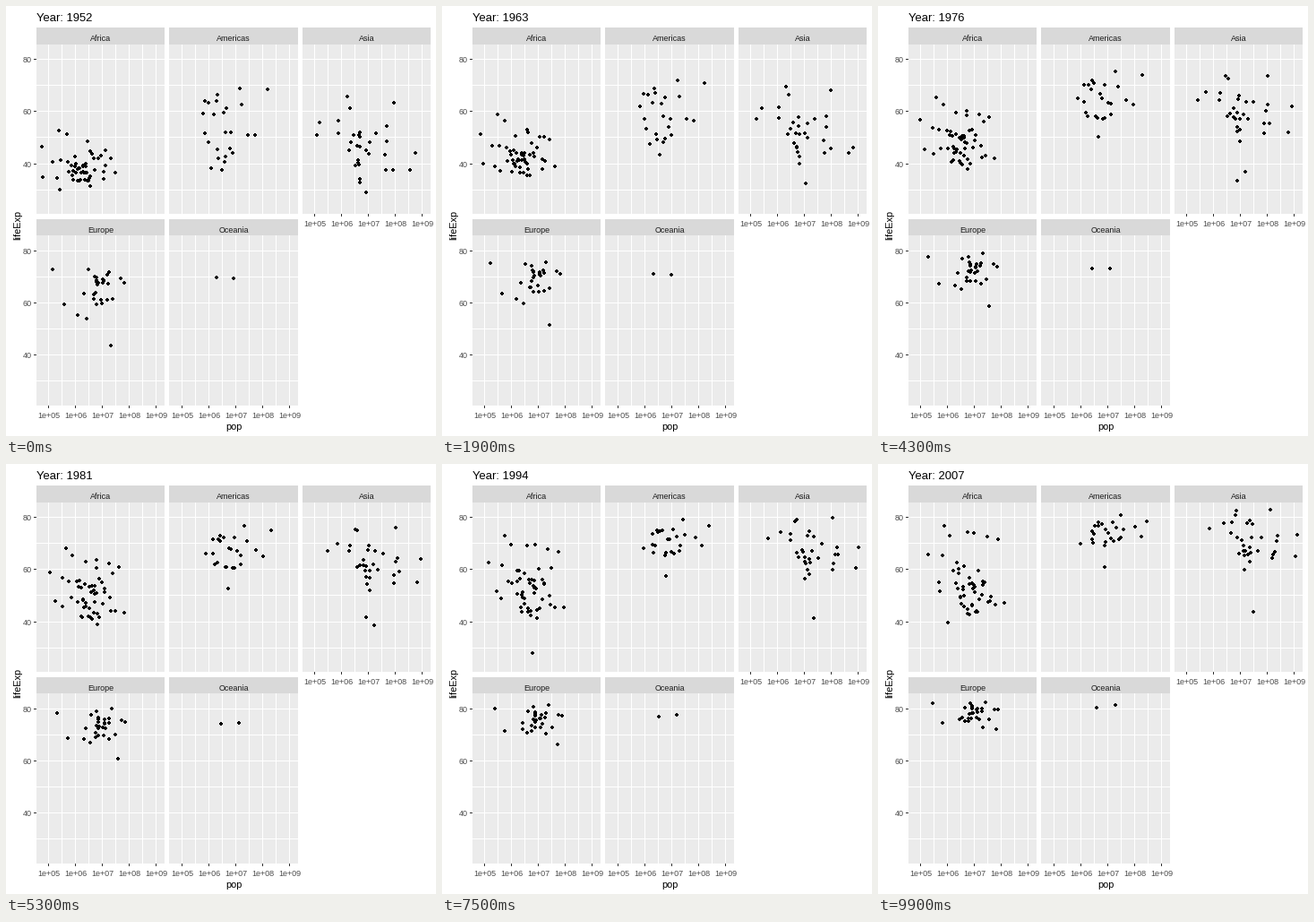
A matplotlib script for the animation above (10000 ms loop, 480 by 480 pixels).

```python
import numpy as np
import matplotlib.pyplot as plt
from matplotlib.animation import FuncAnimation
from matplotlib.collections import PolyCollection
from matplotlib.patches import Rectangle

plt.rcParams["font.family"] = "Liberation Sans"

SIZE, DPI, FRAMES = 480, 72, 100
START, MID, END = 1952, 1987, 2007
YEARS = np.linspace(START, END, FRAMES)

# Panel layout in pixels, y pointing down
LEFT, TOP, WIDTH, HEIGHT = 33.6, 42.6, 143.3, 189.5
COL_STEP, ROW_STEP, STRIP = 148.8, 213.7, 18.4
X_MIN, X_SPAN = 4.561, 4.776
Y_MAX, Y_SPAN = 85.553, 64.904

fig = plt.figure(figsize=(SIZE / DPI, SIZE / DPI), dpi=DPI, facecolor="white")
ax = fig.add_axes([0, 0, 1, 1])
ax.set(xlim=(0, SIZE), ylim=(SIZE, 0))
ax.axis("off")

# Small round dot on the pixel grid: a quarter outline turned four times
DOT = np.array([p for k in range(4)
                for p in [(q * 1j ** k).real + 1j * (q * 1j ** k).imag
                          for q in (-1 - 2j, 1 - 2j, 1 - 1j)]])
DOT = np.column_stack([DOT.real, DOT.imag])


def px(value):
    return np.floor(np.asarray(value) + 0.5).astype(int)


def box(x0, y0, x1, y1, color):
    ax.add_patch(Rectangle((x0, y0), x1 - x0, y1 - y0, fc=color, lw=0,
                           antialiased=False))


def label(x, y, text, size=9, color="black", ha="center", **kw):
    return ax.text(x, y, text, fontsize=size, color=color, ha=ha,
                   va="baseline", **kw)


def x_pos(log_pop, col):
    return px(LEFT + COL_STEP * col + (log_pop - X_MIN) / X_SPAN * WIDTH)


def y_pos(life, row):
    return px(TOP + ROW_STEP * row + (Y_MAX - life) / Y_SPAN * HEIGHT)


def draw_panel(name, col, row, x_axis, y_axis):
    left, top = LEFT + COL_STEP * col, TOP + ROW_STEP * row
    x0, x1, s0, y0, y1 = px([left, left + WIDTH - 0.1, top - STRIP,
                             top, top + HEIGHT])
    box(x0, s0, x1, y0, "#d9d9d9")
    box(x0, y0, x1, y1, "#ebebeb")
    label((x0 + x1) / 2, s0 + 15, name, color="#1a1a1a")
    for exp in np.arange(5, 9.1, 0.5):
        x = x_pos(exp, col)
        box(x, y0, x + 1, y1, "white")
        if x_axis and exp % 1 == 0:
            box(x, y1, x + 1, y1 + 3, "#333333")
            label(x + 0.5, y1 + 14, f"1e+{int(exp):02d}", color="#4d4d4d")
    for life in range(30, 90, 10):
        y = y_pos(life, row)
        box(x0, y, x1, y + 1, "white")
        if y_axis and life % 20 == 0:
            box(x0 - 3, y, x0, y + 1, "#333333")
            label(x0 - 5, y + 4, str(life), color="#4d4d4d", ha="right")


tracks = []


def panel(name, col, row, dots, turns={}, cloud=None, gain=0.76, early=0.46,
          x_axis=True, y_axis=False):
    """dots: (log pop start, end, life start, end); turns: extra life points.

    gain is the share of the change reached by MID, early the share of
    that reached by 1967.
    """
    draw_panel(name, col, row, x_axis, y_axis)

    def add(p0, p1, l0, l1, mid=None, extra={}):
        mid = l0 + gain * (l1 - l0) if mid is None else mid
        mid = extra.get(MID, mid)
        keys = {START: l0, 1967: l0 + early * (mid - l0), MID: mid, END: l1}
        keys.update(extra)
        years = sorted(keys)
        life = np.interp(YEARS, years, [keys[y] for y in years])
        pop = np.interp(YEARS, (START, END), (p0, p1))
        tracks.append(np.column_stack([x_pos(pop, col), y_pos(life, row)]))

    for i, dot in enumerate(dots):
        add(*dot, extra=turns.get(i, {}))
    if cloud:
        for p0, p1, l0, l1, mid in make_cloud(gain=gain, **cloud):
            add(p0, p1, l0, l1, mid)


def make_cloud(seed, n, pop, growth, life, final, slope, spread, gain, bulge=0):
    rng = np.random.default_rng(seed)

    def draw(mean, sd):
        return mean + sd * np.clip(rng.normal(size=n), -1.8, 1.8)

    p0 = draw(*pop)
    p1 = p0 + draw(growth, growth / 6)
    l0 = draw(*life)
    l1 = final + slope * (l0 - life[0]) + draw(0, spread)
    mid = l0 + gain * (l1 - l0) + bulge + draw(0, spread / 2)
    return zip(p0, p1, l0, l1, mid)


panel("Africa", 0, 0, [
    (5.41, 5.90, 52.7, 76.4), (5.71, 6.10, 51.0, 72.8), (4.78, 5.30, 46.5, 65.5),
    (4.80, 5.70, 34.8, 54.8), (5.19, 5.85, 40.7, 65.2), (5.34, 5.74, 34.5, 51.6),
    (5.45, 6.23, 30.0, 59.4), (7.52, 8.13, 36.3, 46.9), (7.35, 7.90, 41.9, 71.3),
    (7.15, 7.64, 45.0, 49.3), (7.15, 7.81, 39.1, 46.5), (5.46, 6.05, 41.4, 39.6),
    (6.49, 7.09, 48.5, 43.5), (6.01, 6.78, 42.7, 74.0), (6.56, 7.01, 44.6, 73.9),
    (6.97, 7.52, 43.1, 72.3), (6.40, 6.95, 40.0, 46.2)],
    turns={9: {MID: 60.8, 1997: 60.2}, 11: {MID: 57.7, 1997: 54.3},
           12: {MID: 62.4, 2002: 40.0}, 16: {MID: 44.0, 1992: 23.6, 1997: 36.1}},
    cloud=dict(seed=5, n=35, pop=(6.42, 0.4), growth=0.57, life=(38.3, 3.9),
               final=51.5, slope=0.5, spread=5.5, bulge=2.5),
    x_axis=False, y_axis=True)

panel("Americas", 1, 0, [
    (8.20, 8.48, 68.4, 78.2), (7.75, 8.28, 50.9, 72.4), (7.48, 8.04, 50.8, 76.2),
    (7.17, 7.52, 68.8, 80.7), (7.25, 7.61, 62.5, 75.3), (5.82, 6.02, 59.1, 69.8),
    (6.51, 6.93, 37.6, 60.9), (6.90, 7.46, 43.9, 71.4), (6.35, 6.54, 66.1, 76.4)],
    cloud=dict(seed=8, n=16, pop=(6.4, 0.29), growth=0.55, life=(52, 7.6),
               final=73.6, slope=0.3, spread=2.2),
    x_axis=False)

panel("Asia", 2, 0, [
    (8.75, 9.12, 44.0, 73.0), (8.57, 9.05, 37.4, 64.7), (7.94, 8.11, 63.0, 82.6),
    (7.91, 8.35, 37.5, 70.7), (7.67, 8.18, 37.5, 64.1), (7.62, 8.23, 43.4, 65.5),
    (6.93, 7.50, 28.8, 43.8), (5.08, 5.85, 50.9, 75.6), (5.20, 6.40, 55.6, 77.6),
    (6.67, 7.15, 39.4, 59.7), (6.33, 6.84, 61.0, 82.2), (6.21, 6.81, 65.4, 80.7),
    (6.70, 7.35, 32.5, 62.7)],
    turns={0: {1957: 50.5, 1962: 44.5, 1967: 58.4}, 9: {1972: 40.3, 1977: 31.2}},
    cloud=dict(seed=3, n=20, pop=(6.8, 0.5), growth=0.6, life=(46.6, 7),
               final=71.5, slope=0.4, spread=3.5))

panel("Europe", 0, 1, [
    (7.35, 7.85, 43.6, 71.8), (5.17, 5.48, 72.5, 81.8), (5.62, 5.84, 59.2, 74.5),
    (6.11, 6.56, 55.2, 76.4), (6.45, 6.66, 53.8, 74.9), (7.84, 7.92, 67.5, 79.4),
    (7.70, 7.78, 69.2, 79.4), (7.41, 7.59, 61.3, 75.6), (7.22, 7.35, 61.1, 72.5),
    (6.52, 6.67, 72.7, 80.2)],
    cloud=dict(seed=11, n=20, pop=(6.85, 0.28), growth=0.12, life=(66.3, 3.9),
               final=78, slope=0.4, spread=2),
    gain=0.69, early=0.58, y_axis=True)

panel("Oceania", 1, 1, [(6.94, 7.31, 69.1, 81.2), (6.30, 6.61, 69.4, 80.2)],
      gain=0.52, early=0.35)

label(254, 473, "pop", 11)
label(16, 244.5, "lifeExp", 11, rotation=90, rotation_mode="anchor")
title = label(34, 17, "", 13, ha="left")

tracks = np.array(tracks)
points = PolyCollection([], facecolors="black", linewidths=0,
                        antialiaseds=False, zorder=3)
ax.add_collection(points, autolim=False)


def update(i):
    points.set_verts(tracks[:, i, None, :] + DOT)
    title.set_text(f"Year: {YEARS[i]:.0f}")
    return points, title


anim = FuncAnimation(fig, update, frames=FRAMES, interval=100, repeat=True,
                     repeat_delay=0)
plt.show()
```
